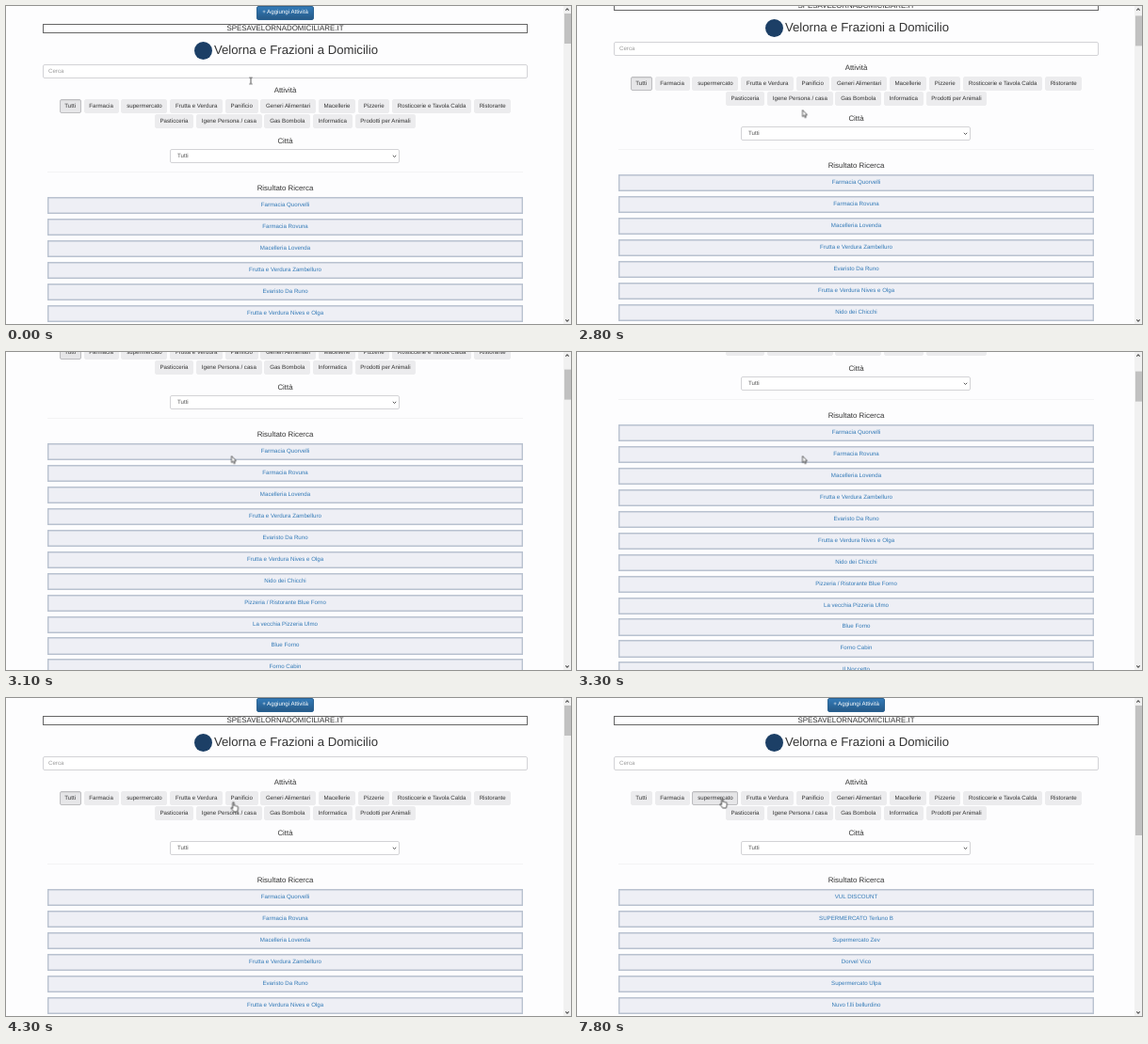
An HTML page that plays this animation: 600x338 px, repeating every 8 s.

```html
<!DOCTYPE html>
<html lang="it">
<head>
<meta charset="utf-8">
<title>Spesa a domicilio</title>
<style>
  html, body { margin: 0; width: 100%; height: 100%; overflow: hidden; background: #fdfdfe; }
  * { box-sizing: border-box; }

  #stage {
    position: relative; width: 600px; height: 338px; overflow: hidden;
    font: 6.15px/1 "Liberation Sans", Arial, sans-serif; color: #333;
    text-rendering: geometricPrecision;
  }
  #stage, #stage * { --loop: 8s infinite -10ms; }
  #page { position: absolute; inset: 0; animation: scroll var(--loop) step-end; }
  #page > * { position: absolute; }

  /* header */
  .add {
    left: 266px; top: 0; width: 61px; height: 15px; border-radius: 2px;
    border: 1px solid #2a6292; background: linear-gradient(#337ab7, #265a88);
    color: #fff; display: flex; align-items: center; justify-content: center; white-space: nowrap;
  }
  .site {
    left: 39px; top: 19px; width: 515px; height: 10px; border: 1px solid #666;
    font-size: 7.9px; line-height: 8.6px; text-align: center;
  }
  .mark { left: 199.5px; top: 38px; width: 19px; height: 19px; border-radius: 50%; background: #1c3f66; }
  h1 { left: 221px; top: 40px; margin: 0; font-size: 13.17px; line-height: 14px; font-weight: 400; white-space: nowrap; }
  h2 { left: 39.5px; width: 514px; margin: 0; font-size: 7.9px; line-height: 10px; font-weight: 400; text-align: center; }

  /* form fields */
  .field {
    height: 15px; border: 1px solid #d3d3d6; border-radius: 2px; background: #fff;
    line-height: 13px; color: #555;
  }
  .search { left: 39px; top: 62px; width: 515px; padding-left: 5px; color: #999; }
  .city { left: 174px; top: 152px; width: 244px; padding-left: 7px; }
  .city svg { position: absolute; right: 2px; top: 5px; }
  .rule { left: 44px; top: 176px; width: 505px; height: 1px; background: #f3f3f4; }

  /* category buttons */
  .cats { left: 0; width: 593px; height: 15px; display: flex; justify-content: center; gap: 2.9px; }
  .cats span {
    height: 15px; padding: 0 4.7px; border: 1px solid #ececee; border-radius: 2px;
    background: #ececee; line-height: 13.4px; white-space: nowrap;
  }
  .cats .all   { animation: all-on   var(--loop) step-end; }
  .cats .pharm { animation: pharm-on var(--loop) step-end; }
  .cats .super { animation: super-on var(--loop) step-end; }

  /* results */
  ol { left: 44px; top: 203px; width: 505px; margin: 0; padding: 0; list-style: none; }
  li {
    height: 18.3px; margin-bottom: 4.65px; background: #eeeff5;
    box-shadow: inset 0 0 0 1.4px #b9c2d0;
    color: #337ab7; line-height: 18.8px; text-align: center;
  }
  .list-all   { animation: list-all   var(--loop) step-end; }
  .list-pharm { animation: list-pharm var(--loop) step-end; }
  .list-super { animation: list-super var(--loop) step-end; }

  /* scrollbar */
  .bar { position: absolute; left: 592px; top: 0; width: 8px; height: 338px; background: #f1f1f1; }
  .bar svg { position: absolute; inset: 0; }
  .thumb { position: absolute; left: 0.5px; top: 7.5px; width: 7px; background: #c1c1c1; animation: thumb var(--loop) step-end; }

  /* pointer */
  #pointer { position: absolute; left: 0; top: 0; width: 20px; height: 20px; overflow: visible; animation: move var(--loop); }
  #pointer .beam  { animation: beam  var(--loop) step-end; }
  #pointer .arrow { animation: arrow var(--loop) step-end; }
  #pointer .hand  { animation: hand  var(--loop) step-end; }

  @keyframes scroll {
    0%     { transform: none; }
    35%    { transform: translateY(-24px); }
    36.25% { transform: translateY(-58px); }
    37.5%  { transform: translateY(-85px); }
    38.75% { transform: translateY(-106px); }
    40%    { transform: translateY(-122px); }
    41.25% { transform: translateY(-126px); }
    42.5%  { transform: translateY(-78px); }
    43.75% { transform: translateY(-26px); }
    45%, 100% { transform: none; }
  }
  @keyframes thumb {
    0%     { height: 32.5px; transform: none; }
    35%    { transform: translateY(2.4px); }
    36.25% { transform: translateY(5.8px); }
    37.5%  { transform: translateY(8.5px); }
    38.75% { transform: translateY(10.6px); }
    40%    { transform: translateY(12.2px); }
    41.25% { transform: translateY(12.6px); }
    42.5%  { transform: translateY(7.8px); }
    43.75% { transform: translateY(2.6px); }
    45%    { transform: none; }
    76.25%, 100% { height: 138px; transform: none; }
  }
  @keyframes move {
    0%     { transform: translate(260px, 79.5px); animation-timing-function: step-end; }
    22.5%  { transform: translate(260px, 79.5px); animation-timing-function: steps(9); }
    33.75% { transform: translate(239.5px, 110.5px); animation-timing-function: step-end; }
    55%    { transform: translate(239.5px, 110.5px); animation-timing-function: steps(3); }
    58.75% { transform: translate(214px, 113.5px); animation-timing-function: steps(6); }
    66.25% { transform: translate(111px, 98.5px); animation-timing-function: steps(3); }
    70%    { transform: translate(102px, 105.2px); animation-timing-function: step-end; }
    81.25% { transform: translate(102px, 105.2px); animation-timing-function: steps(3); }
    85%    { transform: translate(151px, 112px); animation-timing-function: step-end; }
    87.5%  { transform: translate(151px, 112px); animation-timing-function: steps(2); }
    90%, 100% { transform: translate(152.3px, 106.5px); animation-timing-function: step-end; }
  }
  @keyframes beam  { 0% { opacity: 1; } 25%, 100% { opacity: 0; } }
  @keyframes arrow { 0% { opacity: 0; } 25% { opacity: 1; } 30% { opacity: 0; } 35% { opacity: 1; } 46.25%, 100% { opacity: 0; } }
  @keyframes hand  { 0% { opacity: 0; } 30% { opacity: 1; } 35% { opacity: 0; } 46.25%, 100% { opacity: 1; } }

  @keyframes all-on {
    0% { background: #e6e6e8; border-color: #bdbdc0; box-shadow: inset 0 1px 1px #d6d6d8; }
    76.25%, 100% { background: #ececee; border-color: #ececee; box-shadow: none; }
  }
  @keyframes pharm-on {
    0% { background: #ececee; border-color: #ececee; box-shadow: none; }
    73.75% { background: #e6e6e8; border-color: #bdbdc0; box-shadow: inset 0 1px 1px #d6d6d8; }
    95%, 100% { background: #ececee; border-color: #ececee; box-shadow: none; }
  }
  @keyframes super-on {
    0% { background: #ececee; border-color: #ececee; box-shadow: none; }
    95%, 100% { background: #e6e6e8; border-color: #bdbdc0; box-shadow: inset 0 1px 1px #d6d6d8; }
  }

  @keyframes list-all   { 0% { visibility: visible; } 76.25%, 100% { visibility: hidden; } }
  @keyframes list-pharm { 0% { visibility: hidden; } 76.25% { visibility: visible; } 96.25%, 100% { visibility: hidden; } }
  @keyframes list-super { 0% { visibility: hidden; } 96.25%, 100% { visibility: visible; } }
</style>
</head>
<body>
<div id="stage">
  <div id="page">
    <div class="add">+ Aggiungi Attività</div>
    <div class="site">SPESAVELORNADOMICILIARE.IT</div>
    <div class="mark"></div>
    <h1>Velorna e Frazioni a Domicilio</h1>
    <div class="field search">Cerca</div>

    <h2 style="top:84.5px">Attività</h2>
    <div class="cats" style="top:99px">
      <span class="all">Tutti</span><span class="pharm">Farmacia</span><span class="super">supermercato</span>
      <span>Frutta e Verdura</span><span>Panificio</span><span>Generi Alimentari</span><span>Macellerie</span>
      <span>Pizzerie</span><span>Rosticcerie e Tavola Calda</span><span>Ristorante</span>
    </div>
    <div class="cats" style="top:115px">
      <span>Pasticceria</span><span>Igene Persona / casa</span><span>Gas Bombola</span>
      <span>Informatica</span><span>Prodotti per Animali</span>
    </div>

    <h2 style="top:138.5px">Città</h2>
    <div class="field city">Tutti
      <svg width="5" height="4"><path d="M.8 .8 2.5 2.5 4.2 .8" fill="none" stroke="#444" stroke-width=".9"/></svg>
    </div>
    <div class="rule"></div>
    <h2 style="top:189px">Risultato Ricerca</h2>

    <ol class="list-all">
      <li>Farmacia Quorvelli</li>
      <li>Farmacia Rovuna</li>
      <li>Macelleria Lovenda</li>
      <li>Frutta e Verdura Zambelluro</li>
      <li>Evaristo Da Runo</li>
      <li>Frutta e Verdura Nives e Olga</li>
      <li>Nido dei Chicchi</li>
      <li>Pizzeria / Ristorante Blue Forno</li>
      <li>La vecchia Pizzeria Ulmo</li>
      <li>Blue Forno</li>
      <li>Forno Cabin</li>
      <li>Il Noccetto</li>
    </ol>
    <ol class="list-pharm">
      <li>Farmacia Quorvelli</li>
      <li>Farmacia Rovuna</li>
      <li>Farmacia Lusdero</li>
      <li>Farmacia Ulbi</li>
      <li>Farmacia Castelvunaro</li>
      <li>Farmacia Ovene</li>
    </ol>
    <ol class="list-super">
      <li>VUL DISCOUNT</li>
      <li>SUPERMERCATO Terluno B</li>
      <li>Supermercato Zev</li>
      <li>Dorvel Vico</li>
      <li>Supermercato Ulpa</li>
      <li>Nuvo f.lli bellurdino</li>
    </ol>
  </div>

  <div class="bar">
    <div class="thumb"></div>
    <svg width="8" height="338" fill="none" stroke="#505050" stroke-width="1.1">
      <path d="M2.3 4.6 4 2.9 5.7 4.6M2.3 333.4 4 335.1 5.7 333.4"/>
    </svg>
  </div>

  <svg id="pointer">
    <path class="beam" d="M-1.6-3.4Q-.3-3.4 0-2.9 .3-3.4 1.6-3.4M0-2.9V2.9M-1.6 3.4Q-.3 3.4 0 2.9 .3 3.4 1.6 3.4"
          fill="none" stroke="#333" stroke-width=".8"/>
    <path class="arrow" d="M0 0V7.2L1.6 5.7 2.7 8.2 3.9 7.7 2.8 5.2H5Z"
          fill="#fff" stroke="#222" stroke-width=".7" stroke-linejoin="round"/>
    <path class="hand" d="M1.2 6.9V1.2Q1.2.2 2 .2T2.8 1.2V4Q3.6 3.4 4.3 4.2 5.1 3.7 5.6 4.5 6.8 4.2 6.9 5.5V7.6Q6.8 9 6 10.4H2.4Q1.6 8.9-.2 7.2-.8 6.2 0 5.9 .6 5.9 1.2 6.9Z"
          fill="#fff" stroke="#222" stroke-width=".8" stroke-linejoin="round"/>
  </svg>
</div>
</body>
</html>
```
